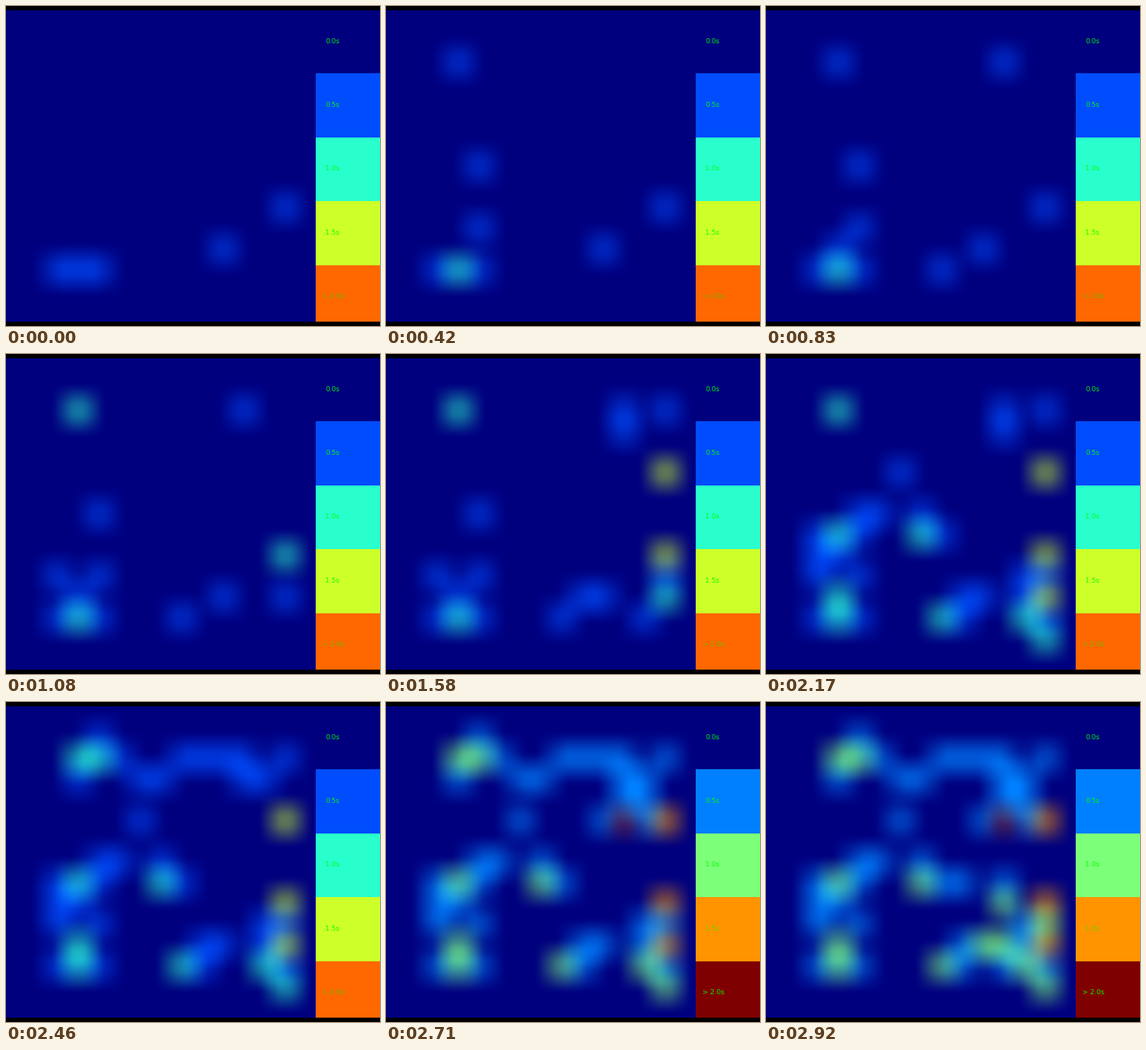
Recreate the animation shown at these times as a matplotlib script. Size 512 by 438 pixels, loop 2960 ms.

```python
import numpy as np
import matplotlib.pyplot as plt
from matplotlib.animation import FuncAnimation

W, H = 512, 438
MAP_W, TOP, BOTTOM = 425, 6, 432
LEGEND_X, LEGEND_Y, BAND = 424, 5.6, 87.35
CELLS = 15
BLUR, SOFTEN = 42, 10     # blur window and its edge softening, in pixels
LOOP_MS, INTERVAL, STEPS = 2960, 20, 71


def stroke(*keys):
    """Cells the gaze crosses on straight moves between key cells."""
    cells = [keys[0]]
    for start, end in zip(keys, keys[1:]):
        move = np.subtract(end, start)
        n = abs(move).max()
        cells += [tuple(np.add(start, move * k // n)) for k in range(1, n + 1)]
    return cells


looks = []                # (step, column, row): each look adds one level


def gaze(first, last, *strokes):
    """Spread the looks of some strokes evenly over a span of steps."""
    cells = sum(strokes, [])
    times = np.linspace(first, last, len(cells)).round()
    looks.extend((t, c, r) for t, (c, r) in zip(times, cells))


gaze(0, 0, stroke((2, 12), (4, 12)), stroke((10, 11)), stroke((13, 9)))
gaze(2, 10, stroke((3, 12)), stroke((4, 10)), stroke((4, 7)), stroke((3, 2)))
gaze(14, 26, stroke((8, 12)), stroke((11, 2)), stroke((3, 11), (2, 10)),
     stroke((3, 2)), stroke((13, 9)), stroke((13, 11)))
gaze(28, 38, stroke((13, 9), (13, 11), (12, 12)), stroke((9, 11)),
     stroke((11, 3)), stroke((13, 2)), stroke((13, 5)) * 3)
gaze(39, 45, stroke((6, 5)), stroke((5, 7), (4, 8), (2, 8), (2, 9), (3, 9)),
     stroke((3, 8)), stroke((3, 11)))
gaze(46, 51, stroke((7, 7), (7, 8), (8, 8)), stroke((7, 8)),
     stroke((8, 12), (9, 12)), stroke((13, 11)),
     stroke((12, 10), (12, 12), (13, 12)), stroke((13, 13)) * 2)
gaze(53, 59, stroke((4, 1), (4, 2), (3, 3)),
     stroke((4, 2), (5, 2), (6, 3), (7, 3), (8, 2), (10, 2)), stroke((12, 3)))
gaze(60, 70, stroke((11, 4), (12, 4), (12, 5), (10, 5)), stroke((11, 5)) * 3,
     stroke((9, 8)), stroke((11, 8), (11, 9)), stroke((11, 9)),
     stroke((10, 11), (11, 11), (11, 12)), stroke((11, 11)), stroke((13, 10)))


def blur_weights(size):
    """Share of each cell inside the blur window around every pixel."""
    edges = np.linspace(0, size, CELLS + 1)
    lo, hi = edges[:-1].copy(), edges[1:].copy()
    lo[0], hi[-1] = -2 * BLUR, size + 2 * BLUR
    shift = np.arange(SOFTEN) - (SOFTEN - 1) / 2
    mid = (np.arange(size)[:, None] + 0.5 + shift)[..., None]
    overlap = np.minimum(hi, mid + BLUR / 2) - np.maximum(lo, mid - BLUR / 2)
    return overlap.clip(0).mean(axis=1) / BLUR


rows_w = blur_weights(BOTTOM - TOP)
cols_w = blur_weights(MAP_W)
jet = plt.get_cmap("jet")


def levels_at(step):
    levels = np.zeros((CELLS, CELLS))
    for t, c, r in looks:
        if t <= step:
            levels[r, c] += 1
    return levels


def paint(step):
    levels = levels_at(step)
    scale = 4 if levels.max() >= 4 else 5
    stage = np.zeros((H, W, 3))
    colours = jet(levels / scale)[..., :3]
    stage[TOP:BOTTOM, :MAP_W] = np.einsum(
        "yr,rck,xc->yxk", rows_w, colours, cols_w, optimize=True)
    for i in range(5):
        y0, y1 = (int(LEGEND_Y + BAND * k) for k in (i, i + 1))
        stage[max(TOP, y0):min(BOTTOM, y1), LEGEND_X:] = jet(i / scale)[:3]
    return stage.clip(0, 1), scale


fig = plt.figure(figsize=(W / 100, H / 100), dpi=100, facecolor="black")
ax = fig.add_axes([0, 0, 1, 1])
ax.axis("off")
picture = ax.imshow(np.zeros((H, W, 3)), extent=(0, W, H, 0),
                    interpolation="nearest", aspect="auto")

labels = []
for i in range(5):
    name = f"{i / 2:.1f}s" if i < 4 else "> 2.0s"
    labels.append(ax.text(433 if i == 4 else 437.5, 50.7 + BAND * i, name,
                          family="DejaVu Sans", size=6.7, color="#00ff00"))


def draw(i):
    step = min(STEPS - 1, int((i * INTERVAL + 5) * STEPS / LOOP_MS))
    stage, scale = paint(step)
    picture.set_data(stage)
    # The label on the orange band is faint.
    for k, label in enumerate(labels):
        label.set_alpha(0.55 if k == scale - 1 else 0.95)
    return [picture, *labels]


anim = FuncAnimation(fig, draw, frames=LOOP_MS // INTERVAL,
                     interval=INTERVAL, repeat=True, repeat_delay=0)
plt.show()
```
